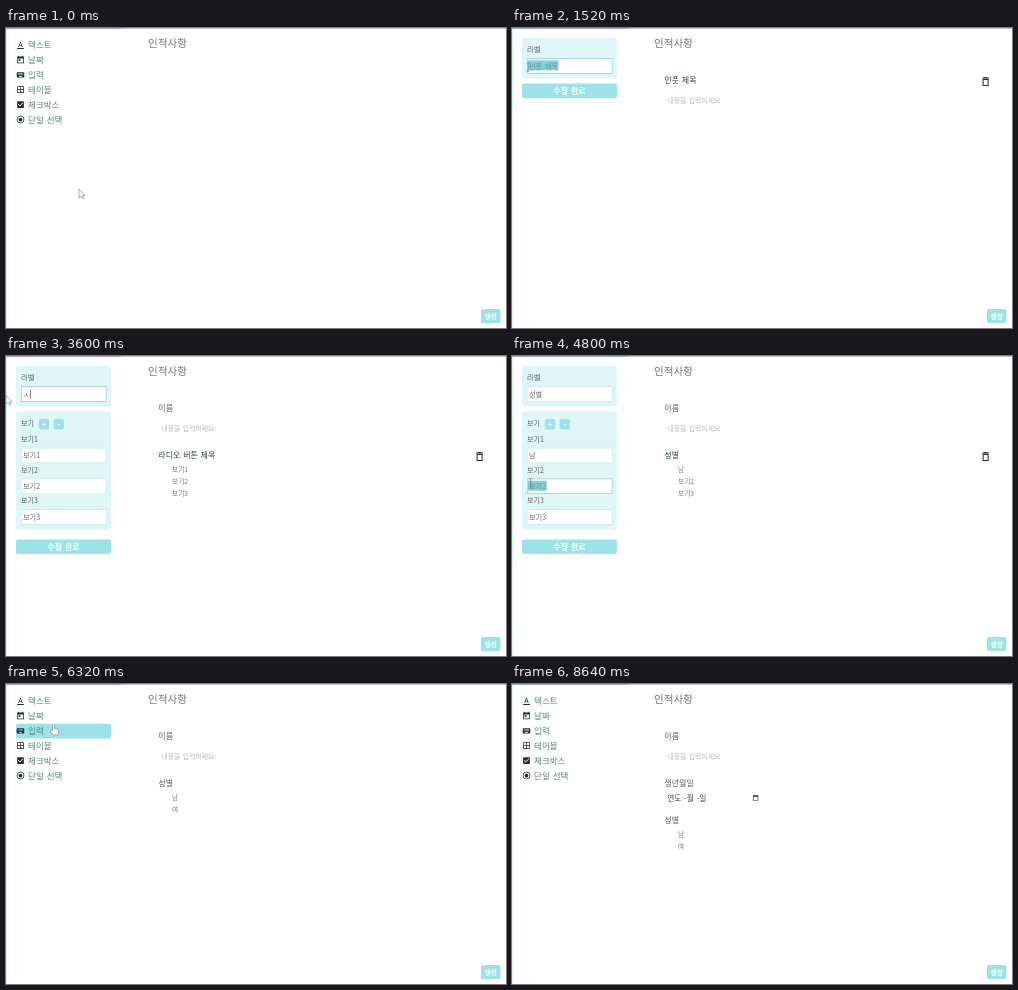
An HTML page with a canvas that plays this animation: 500x300 px, repeating every 8720 ms.

```html
<!DOCTYPE html>
<html lang="ko">
<head>
<meta charset="utf-8">
<style>
html, body { margin: 0; width: 100%; height: 100%; overflow: hidden; background: #fff; }
canvas { display: block; width: 500px; height: 300px; }
</style>
</head>
<body>
<canvas></canvas>
<script>
const LOOP = 8720, STEP = 80, MOVE = 480;
const TEAL = '#9be3e6', PALE = '#dff6f7', INK = '#5d807b', DARK = '#222b2b', GRAY = '#5c6060';
const canvas = document.querySelector('canvas');
const ctx = canvas.getContext('2d');
const ratio = window.devicePixelRatio || 1;
canvas.width = 500 * ratio;
canvas.height = 300 * ratio;
ctx.scale(ratio, ratio);

// Icons on a 24-unit grid, filled with the even-odd rule
function shape(build, outline = '') {
  const p = new Path2D(outline);
  build(p);
  return p;
}
const frameOf = p => { p.rect(3, 3, 18, 18); p.rect(5, 8, 14, 11); };
const calendar = shape(frameOf);
const trash = shape(p => {
  p.rect(6, 7, 12, 14);
  p.rect(8, 9, 8, 10);
  p.rect(5, 4, 14, 2);
  p.rect(9, 3, 6, 1);
});
const menu = [
  ['텍스트', shape(p => p.rect(3, 20, 18, 2.5), 'M12 2L6 17h2.4l1.2-3.4h4.8l1.2 3.4H18zM12 6.2l1.7 5h-3.4z')],
  ['날짜', shape(p => {
    frameOf(p);
    p.rect(7, 10, 5, 5);
    for (const x of [6, 16]) p.rect(x, 1, 2, 2);
  })],
  ['입력', shape(p => {
    p.roundRect(2, 5, 20, 14, 2);
    for (let i = 0; i < 10; i++) p.rect(5 + i % 5 * 3, i < 5 ? 8 : 11, 2, 2);
    p.rect(8, 15, 8, 2);
  })],
  ['테이블', shape(p => {
    p.rect(3, 3, 18, 18);
    for (let i = 0; i < 4; i++) p.rect(5 + i % 2 * 8, i < 2 ? 5 : 13, 6, 6);
  })],
  ['체크박스', shape(p => p.roundRect(3, 3, 18, 18, 2), 'M10 17l-5-5 1.4-1.4 3.6 3.6 7.6-7.6L19 8z')],
  ['단일 선택', shape(p => {
    for (const r of [10, 8, 5]) {
      p.moveTo(12 + r, 12);
      p.arc(12, 12, r, 0, 7);
    }
  })]
];
const arrow = new Path2D('M0 0V9L2.1 7.1 3.6 10 5 9.3 3.7 6.6H6.2Z');
const hand = new Path2D('M-1 1Q0-.8 1 1V4L4.6 5Q5.5 5.4 5.2 7L4.4 10.5H-.4L-3.2 6.6Q-3 5-1 6Z');

// Layout
const OPTIONS = ['opt1', 'opt2', 'opt3'];
const rowY = i => 17.3 + i * 14.9;
const optionY = i => 91.8 + i * 30.7;
const inputY = key => key === 'label' ? 30.2 : optionY(OPTIONS.indexOf(key));
const doneY = state => state.edit === 'sex' ? optionY(state.options.length) - 0.5 : 55.5;

// The script: timed state changes, and the points where the pointer must be
const events = [], stops = [];
const on = (t, patch) => events.push([t, patch]);
const point = (t, x, y) => stops.push({ t, x, y });

function open(t, row, field, title) {
  point(t, 46, rowY(row));
  on(t, { edit: field, [field]: title, label: title, focus: 'label', selected: false });
}
function select(t, focus, x = 16) {
  const y = inputY(focus) + 9;
  point(t - STEP, 57, y);
  point(t, x, y);
  on(t, { focus, selected: true });
}
function type(t, key, steps, title) {
  steps.split(',').forEach((text, i) => {
    on(t + i * STEP, { [key]: text, focus: key, selected: false });
    if (title) on(t + (i + 1) * STEP, { [title]: text });
  });
}
function close(t, y = 63) {
  point(t, 60, y);
  on(t, { edit: '', selected: false });
}

on(0, { edit: '', options: OPTIONS, opt1: '보기1', opt2: '보기2', opt3: '보기3' });
point(0, 73, 161);
open(720, 2, 'name', '인풋 제목');
select(1440, 'label');
type(1680, 'label', 'ㅇ,이,이ㄹ,이르,이름', 'name');
close(2240);
point(2640, 45, 71);
open(2960, 5, 'sex', '라디오 버튼 제목');
select(3440, 'label', 0);
type(3600, 'label', 'ㅅ,서,성,성ㅂ,성벼,성별', 'sex');
select(4240, 'opt1');
type(4400, 'opt1', 'ㄴ,나,남');
select(4720, 'opt2');
type(4880, 'opt2', 'ㅇ,여');
point(5200, 52, 68);
on(5200, { options: OPTIONS.slice(0, 2) });
close(5520, 160);
point(5680, 67, 144);
open(6400, 1, 'date', '날짜 제목');
select(7120, 'label');
type(7200, 'label', '새,생녀,생년,생년워,생년월이,생년월일', 'date');
close(7840);
point(8560, 185, 183);
events.sort((a, b) => a[0] - b[0]);

function pointerAt(t) {
  const i = stops.findIndex(s => s.t > t);
  if (i < 0) return stops[stops.length - 1];
  const a = stops[i - 1], b = stops[i];
  const k = Math.max(0, 1 - (b.t - t) / Math.min(MOVE, b.t - a.t));
  const ease = k * k * (3 - 2 * k);
  return { x: a.x + (b.x - a.x) * ease, y: a.y + (b.y - a.y) * ease };
}

function text(s, x, cy, size, color, weight = 400, align = 'left') {
  ctx.font = `${weight} ${size}px "Noto Sans CJK KR", "Noto Sans CJK", sans-serif`;
  ctx.wordSpacing = size * 0.12 + 'px';
  ctx.textAlign = align;
  ctx.fillStyle = color;
  ctx.fillText(s, x, cy + size * 0.37);
  return ctx.measureText(s).width;
}

function box(x, y, w, h, color, r = 0) {
  ctx.fillStyle = color;
  ctx.beginPath();
  ctx.roundRect(x, y, w, h, r);
  ctx.fill();
}

function icon(path, x, y, size) {
  ctx.save();
  ctx.translate(x, y);
  ctx.scale(size / 24, size / 24);
  ctx.fillStyle = DARK;
  ctx.fill(path, 'evenodd');
  ctx.restore();
}

function button(s, x, y, w, h, size) {
  box(x, y, w, h, TEAL, 2);
  text(s, x + w / 2, y + h / 2, size, '#fff', 700, 'center');
}

function input(state, key) {
  const y = inputY(key), cy = y + 7.7;
  const focused = state.focus === key;
  box(15, y, 85.5, 15.5, focused ? '#9fc9d2' : '#cfeaec');
  box(15.7, y + 0.7, 84.1, 14.1, '#fff');
  const width = text(state[key], 17, cy, 7.2, '#666');
  if (!focused) return;
  if (state.selected) {
    box(16, cy - 5.5, width + 1.5, 10, '#83cfd6');
    text(state[key], 17, cy, 7.2, '#5a9aa3');
  } else {
    box(17.5 + width, cy - 4, 0.7, 8, '#555');
  }
}

function drawMenu(hovered) {
  menu.forEach(([name, path], i) => {
    const cy = rowY(i);
    if (hovered === i) box(10, cy - 7.3, 95, 14.6, TEAL, 2);
    icon(path, 10, cy - 4.8, 9);
    text(name, 22.1, cy, 8.5, INK);
  });
}

function drawEditor(state) {
  box(10, 10, 95, 40.5, PALE, 2);
  text('라벨', 15, 21.3, 7.3, GRAY);
  input(state, 'label');
  if (state.edit === 'sex') {
    box(10, 55.5, 95, doneY(state) - 65.5, PALE, 2);
    text('보기', 15, 67.5, 7, GRAY);
    button('+', 32.8, 63, 10.4, 10.4, 7);
    button('-', 47.6, 63, 10.4, 10.4, 7);
    state.options.forEach((key, i) => {
      text('보기' + (i + 1), 15, optionY(i) - 8.5, 7, GRAY);
      input(state, key);
    });
  }
  button('수정 완료', 10, doneY(state), 95, 14.7, 8);
}

function heading(state, field, cy) {
  const active = state.edit === field;
  text(state[field], 152.3, cy, 8, active ? '#2c4444' : GRAY, active ? 500 : 400);
  if (active) icon(trash, 467.6, cy - 5, 12);
}

function drawForm(state) {
  text('인적사항', 142, 15.3, 10.6, '#777', 300);
  if (state.name) {
    heading(state, 'name', 52.5);
    text('내용을 입력하세요', 155.3, 72.5, 6.9, '#bbb', 300);
  }
  if (state.date) {
    heading(state, 'date', 99.5);
    text('연도 -월 -일', 155.3, 114, 7.7, '#444');
    icon(calendar, 240, 110.3, 7.2);
  }
  if (state.sex) {
    const y = state.date ? 136.3 : 99.5;
    heading(state, 'sex', y);
    state.options.forEach((key, i) => text(state[key], 166, y + 14.5 + i * 12, 6.7, '#777'));
  }
  button('생성', 475, 281, 19.5, 14.3, 6.8);
}

function drawPointer(kind, x, y) {
  ctx.save();
  ctx.translate(x, y);
  ctx.lineWidth = 0.6;
  ctx.strokeStyle = '#777';
  ctx.fillStyle = '#fff';
  if (kind === 'beam') {
    ctx.stroke(new Path2D('M-1.7-4H1.7M0-4V4M-1.7 4H1.7'));
  } else {
    const path = kind === 'hand' ? hand : arrow;
    ctx.fill(path);
    ctx.stroke(path);
  }
  ctx.restore();
}

function draw(t) {
  const state = {};
  for (const [when, patch] of events) if (when <= t) Object.assign(state, patch);
  const { x, y } = pointerAt(t);
  const over = (top, h) => x >= 10 && x <= 105 && y >= top && y <= top + h;

  box(0, 0, 500, 300, '#fff');
  box(0, 0, 1, 300, '#d9f5f2');
  box(0, 0, 500, 1, '#c0c5c5');
  box(0, 0, 115, 1, '#a3acac');
  drawForm(state);

  let kind = 'arrow';
  if (state.edit) {
    drawEditor(state);
    const inputs = state.edit === 'sex' ? ['label', ...state.options] : ['label'];
    if (state.selected || inputs.some(key => over(inputY(key), 15.5))) kind = 'beam';
    else if (over(doneY(state), 14.7)) kind = 'hand';
  } else {
    const hovered = menu.findIndex((_, i) => over(rowY(i) - 7.4, 14.9));
    drawMenu(hovered);
    if (hovered >= 0) kind = 'hand';
  }
  if (t < 8640) drawPointer(kind, x, y);
}

function frame() {
  const t = performance.now() % LOOP;
  draw(Math.floor(t / STEP) * STEP);
  requestAnimationFrame(frame);
}
frame();
</script>
</body>
</html>
```
